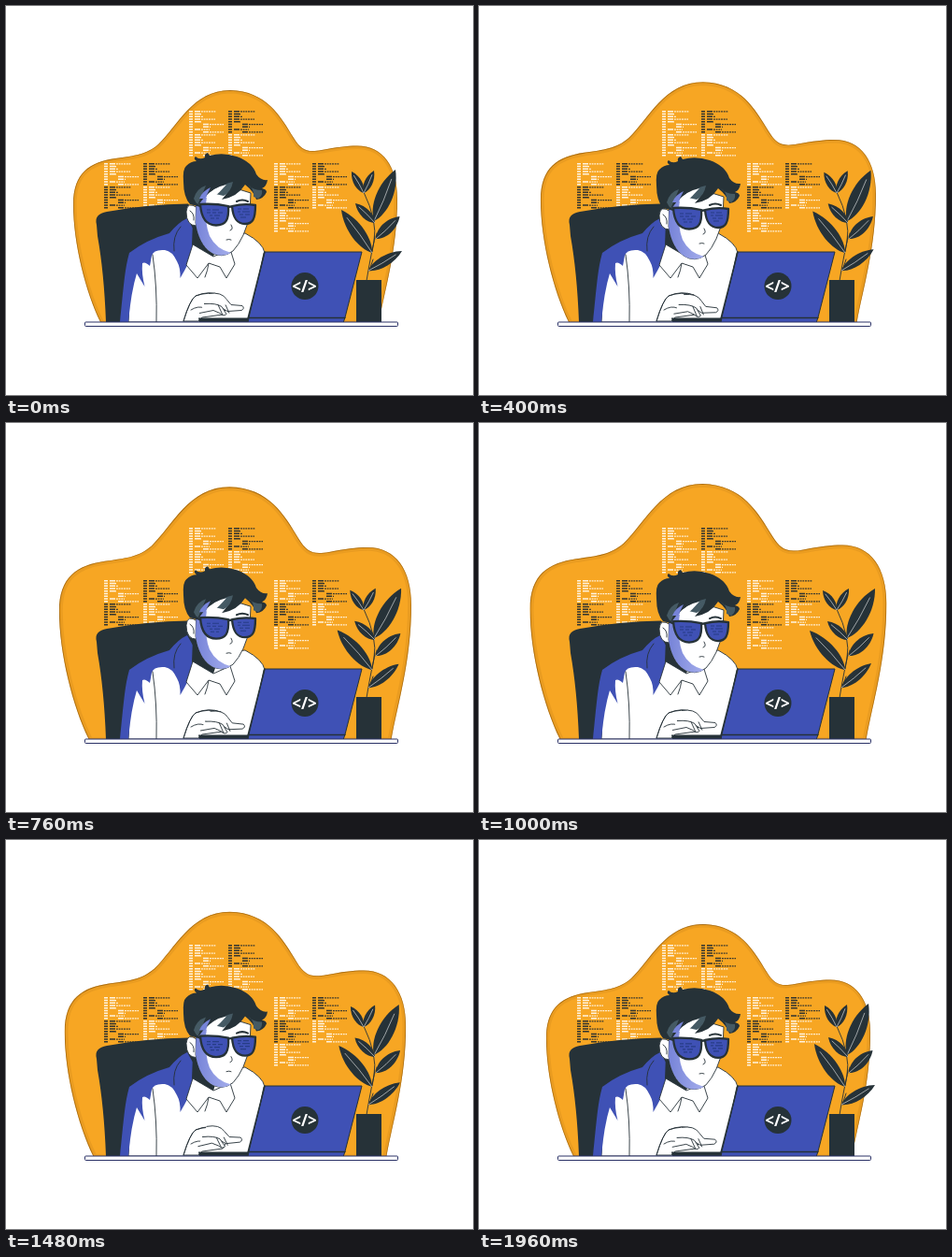
Write an HTML page that moves like this. It is 500 px wide and 416 px high and loops after 2 s.

```html
<!DOCTYPE html>
<html lang="en">
<head>
<meta charset="utf-8">
<style>
html, body { margin: 0; width: 100%; height: 100%; overflow: hidden; background: #fff; }
svg { display: block; width: 500px; height: 416px; }
.dark { fill: #263238; }
.blue { fill: #3f51b5; }
.white { fill: #fff; }
.grey { fill: #455a64; }
.line { fill: none; stroke: #263238; stroke-width: .9; stroke-linecap: round; stroke-linejoin: round; }
.skin { fill: #fff; stroke: #263238; stroke-width: .9; stroke-linejoin: round; }
</style>
</head>
<body>
<svg viewBox="0 0 500 416">
  <defs>
    <path id="shape" d="M102 340C86 308 72 255 72 212C72 178 90 167 117 163C138 160 150 159 163 148C184 128 200 90 240 90C279 91 294 118 308 141C316 154 322 157 338 154C354 151 364 149.500 376 149.500C404 149.500 419 172 419 206C419 262 405 305 399 340Z"/>
    <clipPath id="inside"><use href="#shape"/></clipPath>
    <clipPath id="above"><rect width="500" height="338"/></clipPath>
    <linearGradient id="shade"><stop offset="0" stop-color="#7683d8"/><stop offset="1" stop-color="#a5aeec"/></linearGradient>
  </defs>

  <g clip-path="url(#above)">
    <g id="blob">
      <use href="#shape" fill="#f7a623"/>
      <g clip-path="url(#inside)" fill="none" stroke="#7a4b0c">
        <use href="#shape" stroke-width="7" opacity=".1"/>
        <use href="#shape" stroke-width="1.5" opacity=".55"/>
      </g>
    </g>
  </g>

  <g id="code"></g>

  <!-- chair and body -->
  <path class="dark" d="M97 234C95 225 99 222 108 220Q150 212 195 211.500L206 225L200 338H107Q105 285 98 246Z"/>
  <path class="skin" d="M131 338Q133 287 138 268L180 242L205 248L256 243Q275 253 277 264L260 338Z"/>
  <path class="blue" d="M122 338C126 300 127 282 132 264Q150 250 175 243Q185 231 194 227L203 243L201 262Q196 275 186.500 291Q187 280 183 273Q178 262 170 261Q158 260 156 267L154 278Q149 273 146 275Q145 286 148.500 300Q143 291 140 286Q134 305 131 338Z"/>
  <path class="line" d="M180 262Q178 246 187 236M157 266Q162 300 161 338M276 264Q268 305 260 333M217 275Q216 283 213 290"/>
  <path class="dark" d="M200 230L228 250L222 268L199 256Z"/>
  <path class="skin" d="M200 255L193 277L205 291L217 275L229 279L236 291L245 276L240 260L222 268Z"/>

  <!-- hand -->
  <path class="skin" d="M190 337Q197 314 203 310Q217 305 230 309L238 319L232 330L210 333L206 337Z" stroke="none"/>
  <path class="line" d="M190 337Q197 314 203 310Q217 304 230 309M198 325Q206 320 212 323"/>
  <g id="fingers">
    <path class="skin" d="M216 307Q230 305 235 313L240 319L252 320Q255 323 251 325L236 326L228 321L211 318"/>
    <path class="skin" d="M211 318Q224 317 230 321L235 329Q232 332 228 328L221 325L206 328M226 319L231 330M234 319L238 328"/>
  </g>

  <!-- head -->
  <g id="head">
    <path class="skin" d="M205 216Q194 208 193 220Q193 235 204 235Z"/>
    <path class="line" d="M197 219Q202 222 201 229"/>
    <path class="skin" d="M204 200L203 232Q207 255 219 263Q231 271 243 262Q256 248 261 222L262 200L230 190Z"/>
    <path d="M204 198L203 232Q207 255 219 263Q230 270 241 264Q225 260 218 246Q213 234 214 212L216 196Z" fill="url(#shade)"/>
    <path class="dark" d="M197 212Q190 204 190 188Q189 174 193 171Q198 166 204 166Q200 163 203 161Q207 165 213 162Q212 158 216 157L218 160Q232 156 247 161Q264 167 268 180Q273 187 280 186Q279 193 274 195Q279 196 279 199Q276 206 268 207Q265 198 256 191Q248 204 231 207Q239 198 241 191Q223 193 212 205L205 214Z"/>
    <path class="grey" d="M201 206Q204 195 214 192L209 204L205 213ZM224 201Q231 190 243 188Q241 199 233 203ZM259 191Q266 195 265 204L270 206Q275 203 274 197Q264 197 259 191Z"/>
    <path d="M214 205Q221 194 236 191Q229 199 222 205Z" fill="#fff"/>
    <path d="M207 206Q210 198 219 194L213 206Z" fill="#7683d8"/>
    <path d="M247 209Q253 206 259 209" class="line" style="stroke-width:2"/>
    <path d="M201 211L210 215M237 216Q240 213 244 216" class="line" style="stroke-width:2.4"/>
    <g class="blue" stroke="#263238" stroke-width="2.3" stroke-linejoin="round">
      <path d="M208 212Q224 211 238 214C239 229 235 234.500 225 234.500C214 234.500 209 227 208 212Z"/>
      <path d="M242 214Q255 211 267 213C267 228 264 233 256 233C247 233 243 227 242 214Z"/>
    </g>
    <path d="M215 218h4m2 0h7M215 221h4m2 0h4m2 0h5M218 224h3m2 0h6M219 227h4m2 0h3M248 217h4m2 0h6M248 220h3m2 0h8M250 223h4m2 0h5M251 226h6" fill="none" stroke="#263d86" stroke-width="1.1"/>
    <path class="line" d="M241 234Q244 239 240 240M236 250Q239 249 241 250"/>
  </g>

  <!-- plant -->
  <path class="line" d="M386 294Q390 270 394 252Q398 230 383 199M389 283L393 271M392 263L395 246M396 249L397 243"/>
  <g id="leaves"></g>
  <rect class="dark" x="375" y="293" width="27" height="45"/>

  <!-- laptop and desk -->
  <path class="dark" d="M206 333.500H264V339H207Z"/>
  <path class="blue" d="M277 263H381L363 333L361 339H259L260 333Z" stroke="#263238"/>
  <path class="line" d="M260 333.500H363M277 263L259 334" style="stroke-width:1.4"/>
  <circle class="dark" cx="320" cy="299.500" r="14.5"/>
  <text class="white" x="319.500" y="305.500" text-anchor="middle" font-family="'Open Sans', sans-serif" font-weight="700" font-size="17">&lt;/&gt;</text>
  <rect x="84.500" y="338" width="335" height="4.500" rx="1" fill="#fff" stroke="#2a3166"/>
</svg>
<script>
const LOOP = 2000;
const $ = id => document.getElementById(id);
const make = (parent, attrs) => {
  const el = document.createElementNS('http://www.w3.org/2000/svg', 'path');
  for (const key in attrs) el.setAttribute(key, attrs[key]);
  return parent.appendChild(el);
};

// Each row of a code block: start and end of its dotted text.
const rows = [[6, 29], [6, 12], [6, 15], [6, 28], [6, 12], [15, 37], [15, 23], [6, 22], [15, 37]];
const codeBlock = (x, y, color) => rows.forEach(([from, to], i) => {
  const top = y + .8 + i * 2.75;
  make($('code'), { d: `M${x} ${top}h4M${x + from} ${top}H${Math.min(x + from + 6, x + to)}`, stroke: color, 'stroke-width': 1.5 });
  make($('code'), { d: `M${x + from + 7} ${top}H${x + to}`, stroke: color, 'stroke-width': 1.2, 'stroke-dasharray': '1.8 .9' });
});
const light = '#fff3df', ink = '#33352f';
[[196, 112, light], [238, 112, ink], [196, 137, light], [238, 137, light],
 [105, 168, light], [147, 168, ink], [105, 193, ink], [147, 193, light],
 [287, 168, light], [328, 168, ink], [287, 193, ink], [328, 193, light], [287, 218, light]]
  .forEach(block => codeBlock(...block));

// Leaf: base, tip at rest, tip shift when fully swayed, half width.
const leaves = [
  [383, 200, 370, 177, -2, 2, 7], [383, 200, 394, 176, 2, 1, 7],
  [394, 230, 417, 175, 7, 2, 14], [395, 232, 374, 211, -1, 1, 8],
  [392, 264, 359, 218, -5, 4, 12], [396, 249, 421.5, 225, 1, 0, 10],
  [388, 283, 424, 262, -4, -5, 9]
].map(spec => ({
  spec,
  body: make($('leaves'), { class: 'dark' }),
  vein: make($('leaves'), { fill: 'none', stroke: '#fff', 'stroke-width': .7, opacity: .8 })
}));

function drawLeaf({ spec: [bx, by, x, y, dx, dy, width], body, vein }, sway) {
  const tx = x + dx * sway, ty = y + dy * sway;
  const length = Math.hypot(tx - bx, ty - by);
  const ux = (tx - bx) / length, uy = (ty - by) / length;
  const at = (along, side) => `${bx + ux * length * along - uy * side} ${by + uy * length * along + ux * side}`;
  body.setAttribute('d', `M${bx} ${by}C${at(.2, width * .75)} ${at(.65, width * .9)} ${tx} ${ty}C${at(.65, -width * .9)} ${at(.2, -width * .75)} ${bx} ${by}Z`);
  vein.setAttribute('d', `M${bx} ${by}Q${at(.4, width * .12)} ${at(.82, 0)}`);
}

const ease = p => (1 - Math.cos(Math.PI * p)) / 2;
const nod = [0, 4, -4, 4, -4, 0];

function draw(t) {
  const swell = ease(t / 1000);
  const scale = 1 + .1 * swell;
  $('blob').setAttribute('transform', `translate(246 340) scale(${scale}) translate(-246 -340)`);

  const step = Math.floor(t / 400);
  const lift = nod[step] + (nod[step + 1] - nod[step]) * ease(t / 400 - step);
  $('head').setAttribute('transform', `translate(0 ${lift})`);

  const tap = Math.sin(2 * Math.PI * t / LOOP);
  $('fingers').setAttribute('transform', `translate(${1 + 2 * tap} ${.5 + tap}) rotate(${2 * tap} 212 315)`);
  leaves.forEach(leaf => drawLeaf(leaf, swell));
}

const start = performance.now();
function frame() {
  draw((performance.now() - start) % LOOP);
  requestAnimationFrame(frame);
}
draw(0);
requestAnimationFrame(frame);
</script>
</body>
</html>
```
